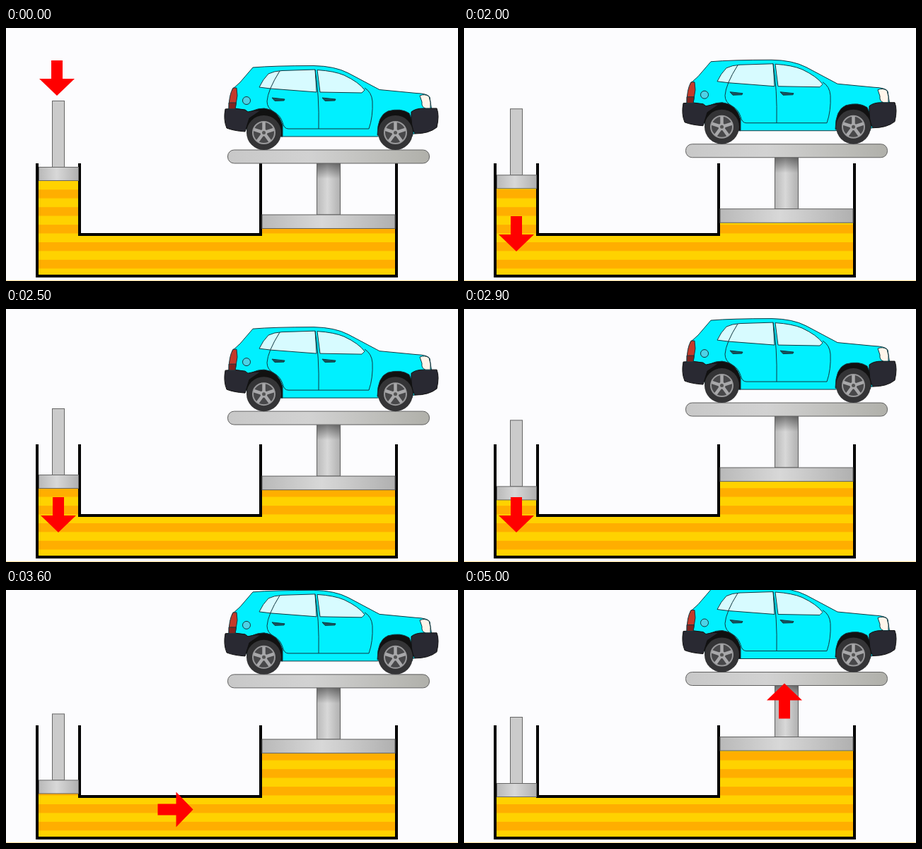
An HTML page that plays this animation: 639x359 px, repeating every 5.1 s.

```html
<!DOCTYPE html>
<html lang="en">
<head>
<meta charset="utf-8">
<title>Hydraulic lift</title>
<style>
  html, body { margin: 0; width: 100%; height: 100%; overflow: hidden; background: #fcfcfe; }
  svg { display: block; width: 639px; height: 359px; }
</style>
</head>
<body>
<svg viewBox="0 0 639 359">
  <defs>
    <pattern id="oil" y="229.3" width="20" height="24.9" patternUnits="userSpaceOnUse">
      <rect width="20" height="24.9" fill="#ffd200"/>
      <rect width="20" height="12.4" fill="#ffae00"/>
    </pattern>
    <linearGradient id="steel">
      <stop offset="0" stop-color="#b9b9b9"/>
      <stop offset=".45" stop-color="#d8d8d8"/>
      <stop offset="1" stop-color="#b0b0b0"/>
    </linearGradient>
    <linearGradient id="plate">
      <stop offset="0" stop-color="#c8c8c8"/>
      <stop offset=".4" stop-color="#d2d2d2"/>
      <stop offset="1" stop-color="#b0b0aa"/>
    </linearGradient>
    <linearGradient id="shade" x2="0" y2="1">
      <stop offset="0" stop-opacity=".45"/>
      <stop offset="1" stop-opacity="0"/>
    </linearGradient>
    <path id="arrow" d="M-8-25H8V1H25L0 25L-25 1H-8Z" fill="#f00"/>
    <g id="wheel">
      <circle r="24.5" fill="#343436"/>
      <circle r="15.500" fill="#48484a" stroke="#98989a" stroke-width="2"/>
      <g id="spokes" stroke="#a8a8aa" stroke-width="4.500"></g>
      <circle r="5" fill="#a8a8aa"/>
      <circle r="2.500" fill="#555"/>
    </g>
  </defs>

  <path d="M0 358.5H639" stroke="#ffe39a"/>

  <g fill="url(#oil)">
    <rect x="44" y="293" width="508" height="59"/>
    <rect id="oilLeft" x="44" width="60"/>
    <rect id="oilRight" x="360" width="192"/>
  </g>

  <path d="M44 192V352H552V192M104 192V293H360V192" fill="none" stroke="#000" stroke-width="4"/>

  <g id="left" fill="url(#steel)" stroke="#666">
    <rect x="65.5" y="103.5" width="17" height="94" fill="#cbcbcb"/>
    <rect x="46.5" y="197.5" width="56" height="19"/>
  </g>

  <g id="right">
    <g fill="url(#steel)" stroke="#606060">
      <rect x="439.5" y="190" width="33" height="75"/>
      <rect x="440" y="192" width="32" height="22" fill="url(#shade)" stroke="none"/>
      <rect x="362" y="265" width="188" height="19.5"/>
      <rect x="313.5" y="173" width="285" height="19" rx="9" fill="url(#plate)"/>
    </g>
    <g stroke="#123740" stroke-linejoin="round">
      <path d="M349 56Q378 53.500 435 53.500Q465 54 484 64L528 87.500L580 92.500Q596 93 599 98L602 118L578 150L524 154H390L330 140L316 116L320 87L331 77Z" fill="#00f0ff"/>
      <path d="M339 140V128Q346 114 365 114Q385 116 391 138V154H380L342 150ZM525 152Q525 124 540 118Q558 113 570 121L578 140L574 154Z" fill="#111"/>
      <path d="M310 115Q324 113 338 116L342 119Q352 116 360 117L344 128L338 147Q322 146 312 142Q307 130 310 115ZM573 119Q579 114 590 114H609Q613 124 609 141Q598 150 578 150Q572 140 573 119Z" fill="#292932" stroke="#111"/>
      <path d="M321 85H326L327 96L324 115H315Q315 95 321 85Z" fill="#c43a2a"/>
      <path d="M315 106H325.500L324 115H315Z" fill="#80251f"/>
      <path d="M585 96Q592 93 598 97Q601 106 600 114H593Q587 112 588 105Z" fill="#fff5ea"/>
      <path d="M358 84Q363 73 371 65Q379 61 390 60.500L437 59L439 91L374 86ZM440 59.500Q464 61 478 67Q499 77 507 88L503 92L444 91Z" fill="#d7fbff"/>
      <g fill="none">
        <path d="M387 61Q370 88 369 104Q369 114 379 119Q388 124 391 134Q393 143 399 143H513Q519 126 518 104Q517 91 507 85M437 59Q443 95 442 143"/>
        <circle cx="340" cy="103" r="5.500" fill="#4cd2e6"/>
      </g>
      <path d="M376 99L394 101L393 103L380 103.500ZM447 99L466 101L465 103L451 103.500Z" fill="#17545e"/>
    </g>
    <use href="#wheel" x="364.500" y="148.500"/>
    <use href="#wheel" x="550.500" y="148.500"/>
  </g>

  <use id="pointer" href="#arrow"/>
</svg>
<script>
  const LOOP = 5100, STEP = 100;
  const START = 1600, CRUISE = 2025, END = 4175;
  const LEFT_TRAVEL = 77, RIGHT_TRAVEL = 56.5;
  const $ = id => document.getElementById(id);

  // Start time, x, y and rotation of each arrow
  const arrows = [
    [0, 72, 71, 0],
    [1700, 74, 292, 0],
    [3100, 239.5, 311.5, -90],
    [4500, 453, 157.5, 180]
  ];

  for (let i = 0; i < 5; i++) {
    $('spokes').innerHTML += `<path d="M0 0V-15" transform="rotate(${i * 72})"/>`;
  }

  // Short acceleration, then a long even slowdown
  function travel(t) {
    if (t <= START) return 0;
    if (t >= END) return 1;
    const span = END - START;
    return t < CRUISE
      ? (t - START) ** 2 / (span * (CRUISE - START))
      : 1 - (END - t) ** 2 / (span * (END - CRUISE));
  }

  function fill(id, top) {
    $(id).setAttribute('y', top);
    $(id).setAttribute('height', 352 - top);
  }

  function draw(now) {
    const t = Math.floor(now % LOOP / STEP) * STEP;
    const down = LEFT_TRAVEL * travel(t), up = RIGHT_TRAVEL * travel(t);
    fill('oilLeft', 216 + down);
    fill('oilRight', 284.5 - up);
    $('left').setAttribute('transform', `translate(0 ${down})`);
    $('right').setAttribute('transform', `translate(0 ${-up})`);
    const [, x, y, angle] = arrows.filter(a => a[0] <= t).pop();
    $('pointer').setAttribute('transform', `translate(${x} ${y}) rotate(${angle})`);
    requestAnimationFrame(draw);
  }
  draw(0);
</script>
</body>
</html>
```
